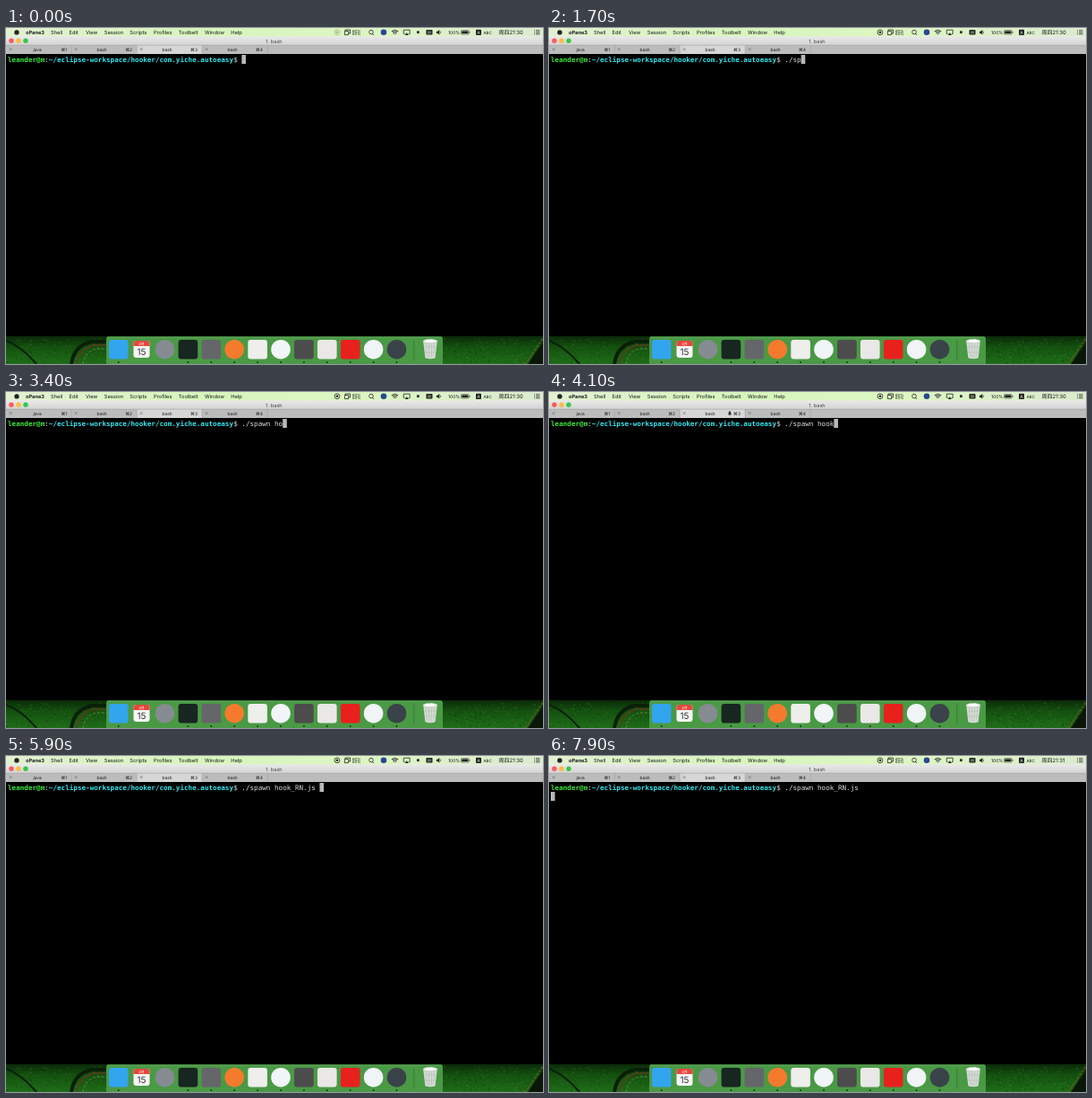
An HTML page for the animation above (8 s loop, 600 px wide and 375 px high).

```html
<!DOCTYPE html>
<html lang="en">
<head>
<meta charset="utf-8">
<title>Terminal typing</title>
<style>
html, body { margin: 0; width: 100%; height: 100%; overflow: hidden; background: #000; }
svg { display: block; width: 100%; height: 100%; }
text { text-rendering: geometricPrecision; white-space: pre; }
.ui { font-family: Inter, "Noto Sans CJK SC", "Noto Sans CJK", sans-serif; }
.mono { font: 7.616px "DejaVu Sans Mono", monospace; }
.bold { font-weight: bold; }
</style>
</head>
<body>
<svg id="stage" viewBox="0 0 600 375" preserveAspectRatio="none">
  <defs>
    <linearGradient id="menuFill">
      <stop offset="0" stop-color="#e2f0d2"/>
      <stop offset=".35" stop-color="#d8f5bd"/>
      <stop offset=".65" stop-color="#dcf6c2"/>
      <stop offset="1" stop-color="#dcebcf"/>
    </linearGradient>
    <linearGradient id="titleFill" x2="0" y2="1">
      <stop offset="0" stop-color="#e9e9e9"/>
      <stop offset="1" stop-color="#d3d3d3"/>
    </linearGradient>
    <linearGradient id="leather" x2="0" y2="1">
      <stop offset="0" stop-color="#0a2608"/>
      <stop offset=".4" stop-color="#14500f"/>
      <stop offset="1" stop-color="#1f6c19"/>
    </linearGradient>
  </defs>

  <rect y="343" width="600" height="32" fill="url(#leather)"/>
  <g id="grain" fill="none" stroke-linecap="round"></g>
  <g fill="none">
    <path d="M0 349Q18 356 34 375" stroke="#08200a" stroke-width="2"/>
    <path d="M73 375Q76 354 96 350H112" stroke="#0a1f08" stroke-width="4"/>
    <path d="M79 375Q82 358 98 354H112" stroke="#5d3a20" stroke-width="1.6"/>
    <path d="M86 375Q88 361 101 358H112" stroke="#7a8c4a" stroke-width=".8" stroke-dasharray="3 2"/>
    <path d="M583 375L600 350V375Z" fill="#0a1708"/>
    <path d="M580 375L600 346" stroke="#8a5a2a" stroke-width="1" stroke-dasharray="3 1.5"/>
  </g>

  <path d="M0 28H600V341Q600 344 597 344H3Q0 344 0 341Z"/>
  <rect width="600" height="10" fill="url(#menuFill)"/>
  <rect y="9.4" width="600" height="9.9" fill="url(#titleFill)"/>
  <rect y="19" width="600" height="10" fill="#bcbcbc"/>
  <rect x="146" y="19" width="73" height="10" fill="#d6d6d6"/>
  <path d="M0 19.2H600M73.2 19V29M146.2 19V29M219.2 19V29M292.2 19V29" stroke="#a1a1a1" stroke-width=".6"/>
  <g id="bar"></g>

  <g id="status" fill="none" stroke="#222" stroke-width=".8">
    <g id="record">
      <circle cx="370" cy="4.8" r="2.9"/>
      <circle cx="370" cy="4.8" r="1.3" fill="#222" stroke="none"/>
    </g>
    <path d="M379 3.2V2H384.5V6H383M378.4 3.5H382.6V7.6H378.4Z"/>
    <circle cx="408" cy="4.6" r="2.3"/>
    <path d="M409.5 6.3L411 8"/>
    <circle cx="422" cy="4.8" r="3.3" fill="#27468f" stroke="none"/>
    <path d="M430.8 3.8Q434.5 .8 438.2 3.8M432 5.2Q434.5 3.3 437 5.2M433.4 6.6Q434.5 5.8 435.6 6.6" stroke-width="1"/>
    <path d="M445.5 6.5H444.3V2.2H451.2V6.5H450"/>
    <path d="M445.6 8L447.8 5.3L450 8Z" fill="#222" stroke="none"/>
    <rect x="459" y="3.3" width="2.8" height="2.8" fill="#333" stroke="none"/>
    <rect x="469.5" y="2" width="7" height="5.5" rx=".8" fill="#222" stroke="none"/>
    <path d="M471 4H475M471 5.7H475" stroke="#cde8b4" stroke-width=".6"/>
    <path d="M481 3.8H482.3L484.3 2V7.6L482.3 5.9H481Z" fill="#222" stroke="none"/>
    <path d="M485.2 3.5Q486.3 4.8 485.2 6.1" stroke-width=".6"/>
    <rect x="508.5" y="2.6" width="8.6" height="4.4" rx=".8" stroke-width=".5"/>
    <rect x="509.3" y="3.4" width="7" height="2.8" fill="#222" stroke="none"/>
    <path d="M518 4V5.7"/>
    <rect x="525" y="1.7" width="6" height="6.4" rx=".8" fill="#222" stroke="none"/>
    <path d="M590 2.8H591M592 2.8H596.5M590 4.8H591M592 4.8H596.5M590 6.8H591M592 6.8H596.5"/>
  </g>
  <g id="labels"></g>

  <g id="bell" fill="#333">
    <path d="M199.9 25.2Q200.7 24.5 200.7 23Q200.8 21.4 202 21.3Q203.2 21.4 203.3 23Q203.3 24.5 204.1 25.2Z"/>
    <circle cx="202" cy="25.7" r=".6"/>
  </g>

  <g id="prompt"></g>
  <rect id="cursor" y="30" width="4.6" height="10" fill="#b9b9b9"/>

  <path d="M112 375V347Q112 344.6 114.5 344.6H485.5Q488 344.6 488 347V375Z" fill="#4a9945"/>
  <path d="M113 345H487" stroke="#76b66f" stroke-width=".6"/>
  <path d="M455.7 348V371" stroke="#2f7430" stroke-width=".7"/>
  <g id="dock"></g>
  <g id="calendar">
    <rect x="142.5" y="349" width="18" height="19" rx="3" fill="#f6f6f6"/>
    <path d="M142.5 355V352Q142.5 349 145.5 349H157.5Q160.5 349 160.5 352V355Z" fill="#e4473d"/>
  </g>
  <g id="bin">
    <path d="M466.2 349.5H481.8L479.6 368.2Q474 370.5 468.4 368.2Z" fill="#d5dcd6"/>
    <path d="M469 352L470.5 367M472.3 352L472.9 368M475.7 352L475.1 368M479 352L477.5 367M467 356H481M467.6 362H480.4" stroke="#a9b4ab" stroke-width=".5"/>
    <ellipse cx="474" cy="349.6" rx="8" ry="2.4" fill="#edf1ed" stroke="#aab5ac" stroke-width=".5"/>
    <path d="M468.5 350L470.5 347.5L473 348.7L476 347.2L479.5 350Z" fill="#fff"/>
  </g>
</svg>

<script>
const LOOP = 8000;
const CELL = 4.585, LEFT = 2;
const byId = id => document.getElementById(id);

function add(parent, tag, attrs, content = "") {
  const node = document.createElementNS("http://www.w3.org/2000/svg", tag);
  for (const key in attrs) node.setAttribute(key, attrs[key]);
  node.textContent = content;
  byId(parent).append(node);
  return node;
}

function label(parent, content, x, y, size, extra = {}) {
  return add(parent, "text", { class: "ui", x, y, "font-size": size, fill: "#151515", ...extra }, content);
}
const centered = { "text-anchor": "middle" };

// Leather grain on both sides of the dock
let seed = 7;
const random = () => (seed = seed * 16807 % 2147483647) / 2147483647;
for (const stroke of ["#0b3209", "#2f8a26"]) {
  let d = "";
  for (let i = 0; i < 180; i++) {
    const x = random() * 224, y = 347 + random() * 28;
    d += `M${(x < 112 ? x : x + 376).toFixed(1)} ${y.toFixed(1)}l1 .6`;
  }
  add("grain", "path", { d, stroke, "stroke-width": 0.8, opacity: 0.55 });
}

// Menu bar
add("bar", "circle", { cx: 12, cy: 4.9, r: 2.7, fill: "#222" });
label("labels", "oPane3", 22, 6.9, 5.7, { "font-weight": 700 });
[["Shell", 50], ["Edit", 70.5], ["View", 89], ["Session", 109.7], ["Scripts", 138.3], ["Profiles", 165],
 ["Toolbelt", 192.8], ["Window", 222], ["Help", 251.3]]
  .forEach(([name, x]) => label("labels", name, x, 6.9, 5.75));
label("labels", "60%", 387, 4.5, 4.2);
label("labels", "63%", 387, 8.4, 4.2);
label("labels", "100%", 494, 6.7, 5);
label("labels", "A", 528, 6.8, 5, { ...centered, fill: "#e4f3d5" });
label("labels", "ABC", 533.5, 6.6, 4.5);
const clock = label("labels", "", 550.5, 7, 6);

// Window title and tabs
["#fc5b57", "#fdbc40", "#34c84a"].forEach((fill, i) =>
  add("bar", "circle", { cx: 6 + 8 * i, cy: 14.2, r: 2.7, fill }));
label("bar", "1. bash", 299.5, 16.6, 5.6, { ...centered, fill: "#444" });
["java", "bash", "bash", "bash"].forEach((name, i) => {
  const x = 73 * i;
  add("bar", "path", { d: `M${x + 3.7} 22.2l3 3m0-3l-3 3`, stroke: "#666", "stroke-width": 0.6 });
  label("bar", name, x + 35 - (i > 0), 25.5, 4.8, centered);
  label("bar", "⌘" + (i + 1), x + 65 - (i > 0), 25.5, 4.8,
    { ...centered, style: 'font-family: Inter, "DejaVu Sans", sans-serif' });
});

// Dock: shape, main colour
const icons = [
  ["square", "#32a5ee"], null, ["circle", "#858b91"], ["square", "#172620"],
  ["square", "#646669"], ["circle", "#f47b2d"], ["square", "#eeeeeb"], ["circle", "#f1f5f8"],
  ["square", "#4c4c4c"], ["square", "#e9e8e6"], ["square", "#e8211d"], ["circle", "#f0f4f6"],
  ["circle", "#3a424a"]
];
icons.forEach((icon, i) => {
  const x = 125.7 + 25.9 * i;
  if (icon) {
    const [shape, fill] = icon;
    if (shape === "circle") add("dock", "circle", { cx: x, cy: 358.7, r: 10.8, fill });
    else add("dock", "rect", { x: x - 10.8, y: 348, width: 21.6, height: 21.6, rx: 3, fill });
  }
  if (i !== 1 && i !== 2) add("dock", "circle", { cx: x, cy: 373, r: 0.9, fill: "#122b12" });
});
label("calendar", "4月", 151.5, 353.8, 4, { ...centered, fill: "#fff" });
label("calendar", "15", 151.5, 364.8, 10, { ...centered, fill: "#333" });

// Prompt
let column = 0;
function run(content, fill, weight = "") {
  const node = add("prompt", "text",
    { class: "mono " + weight, x: LEFT + column * CELL, y: 37.5, fill }, content);
  column += content.length;
  return node;
}
run("leander@m", "#3ee63e", "bold");
run(":", "#d8d8d8");
run("~/eclipse-workspace/hooker/com.yiche.autoeasy", "#33e6ee", "bold");
run("$ ", "#d8d8d8");
const command = run("", "#dedede");

// Time and number of visible characters; completion adds several at once
const LINE = "./spawn hook_RN.js ";
const KEYS = [[0, 0], [500, 1], [700, 2], [1300, 3], [1600, 4], [2100, 8], [2900, 9],
  [3100, 10], [3500, 12], [4500, 13], [4900, 14], [5100, 15], [5500, 19]];
const ENTER = 7500, MINUTE = 6500, BELL = [3700, 5000], RECORD = 300;

function draw(now) {
  const t = now % LOOP;
  const count = KEYS.findLast(([at]) => at <= t)[1];
  const entered = t >= ENTER;
  command.textContent = LINE.slice(0, count);
  byId("cursor").setAttribute("x", LEFT + (entered ? 0 : (column + count) * CELL));
  byId("cursor").setAttribute("y", entered ? 40 : 30);
  byId("bell").setAttribute("visibility", t >= BELL[0] && t < BELL[1] ? "visible" : "hidden");
  byId("record").setAttribute("opacity", t < RECORD ? 0.3 : 1);
  clock.textContent = t < MINUTE ? "周四21:30" : "周四21:31";
}

const start = performance.now();
function tick() {
  draw(performance.now() - start);
  requestAnimationFrame(tick);
}
tick();
</script>
</body>
</html>
```
